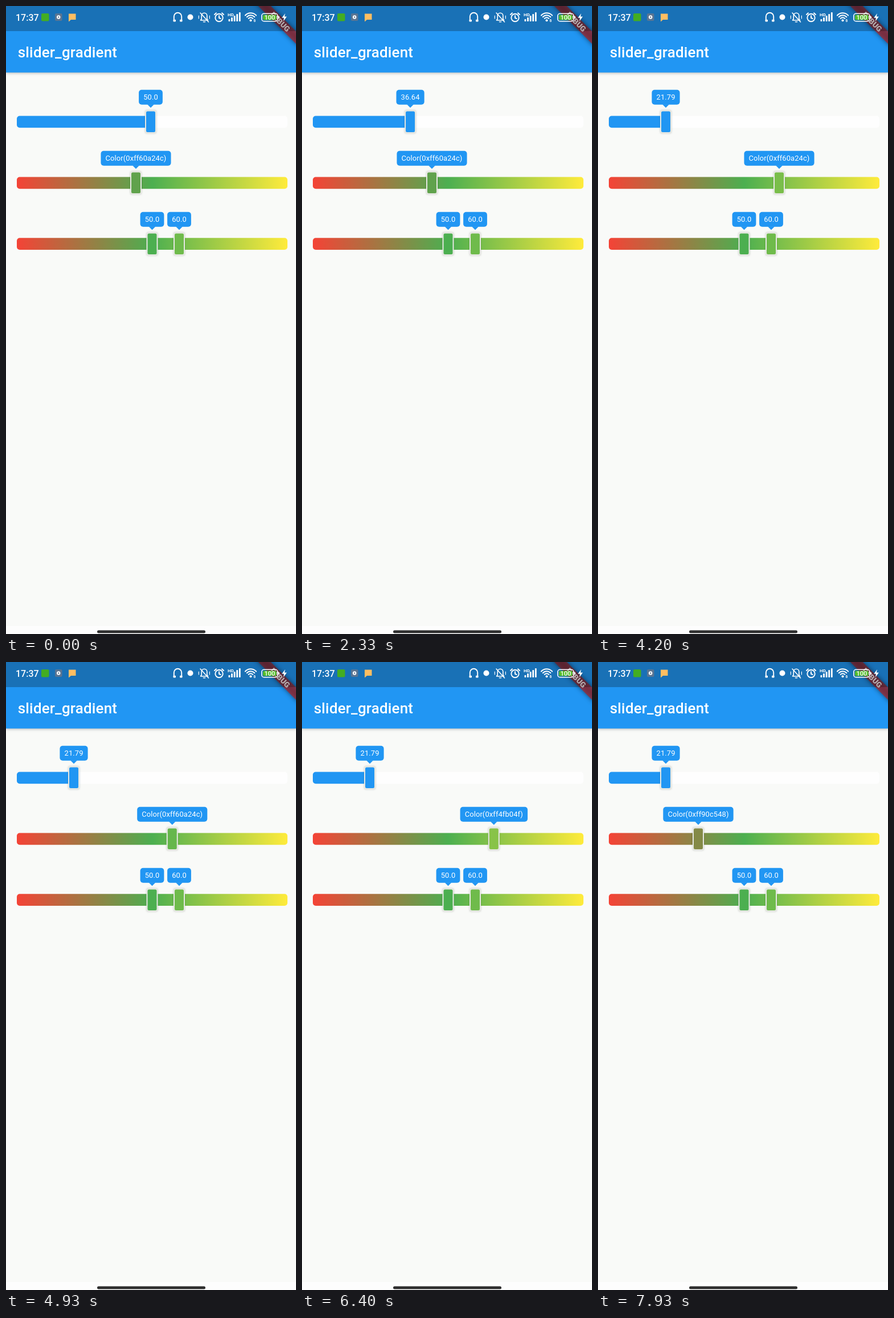
Animation, 509 px wide and 1100 px high, one loop 8 s. Source, as an HTML page with a canvas:

```html
<!DOCTYPE html>
<html lang="en">
<head>
<meta charset="utf-8">
<title>slider_gradient</title>
<style>
html, body { margin: 0; width: 100%; height: 100%; overflow: hidden; background: #f9faf8; }
canvas { display: block; width: 509px; height: 1100px; }
</style>
</head>
<body>
<canvas id="stage"></canvas>
<script>
const W = 509, H = 1100, LOOP = 8000, FPS = 15;
const BLUE = '#2196f3', FONT = 'Roboto, "Noto Sans", sans-serif';
const STOPS = [[244, 67, 54], [76, 175, 80], [255, 235, 59]];
const LEFT = 19, SPAN = 475, TRACK_H = 20.7;
const ROWS = [202.8, 309.8, 416.7];

// [step, value], at FPS steps per second
const VALUE_KEYS = [[20, 50], [35, 36.64], [45, 21.79]];
const COLOR_KEYS = [[51, .44], [63, .6295], [68, .66], [79, .509], [88, .509],
  [96, .669], [104, .69025], [110, .69025], [119, .3305], [120, .31]];
// The colour label only follows when a drag ends
const COMMITS = [[0, .44], [79, .509], [104, .69025]];

const canvas = document.getElementById('stage');
const dpr = window.devicePixelRatio || 1;
canvas.width = W * dpr;
canvas.height = H * dpr;
const ctx = canvas.getContext('2d');

// Monotone cubic through the keys, at rest on turning points
function track(keys, t) {
  const last = keys.length - 1;
  if (t <= keys[0][0]) return keys[0][1];
  if (t >= keys[last][0]) return keys[last][1];
  const slope = k => (keys[k + 1][1] - keys[k][1]) / (keys[k + 1][0] - keys[k][0]);
  const tangent = k => {
    if (k === 0 || k === last) return 0;
    const a = slope(k - 1), b = slope(k);
    return a * b <= 0 ? 0 : 2 * a * b / (a + b);
  };
  let i = 0;
  while (t > keys[i + 1][0]) i++;
  const [t0, v0] = keys[i], [t1, v1] = keys[i + 1];
  const d = t1 - t0, u = (t - t0) / d, w = 1 - u;
  return w * w * (1 + 2 * u) * v0 + u * u * (3 - 2 * u) * v1
    + d * u * w * (w * tangent(i) - u * tangent(i + 1));
}

function mix(f) {
  const i = f < .5 ? 0 : 1, u = f * 2 - i;
  return STOPS[i].map((c, k) => Math.floor(c + (STOPS[i + 1][k] - c) * u));
}
const rgb = c => `rgb(${c.join()})`;
const hex = c => 'Color(0xff' + c.map(n => n.toString(16).padStart(2, '0')).join('') + ')';

function format(v) {
  const s = String(Math.round(v * 100) / 100);
  return s.includes('.') ? s : s + '.0';
}

function box(x, y, w, h, r, fill) {
  ctx.fillStyle = fill;
  ctx.beginPath();
  ctx.roundRect(x, y, w, h, r);
  ctx.fill();
}

function shape(points, fill) {
  ctx.fillStyle = fill;
  ctx.beginPath();
  points.forEach(p => ctx.lineTo(...p));
  ctx.closePath();
  ctx.fill();
}

function line(...points) {
  ctx.beginPath();
  points.forEach(p => ctx.lineTo(...p));
  ctx.stroke();
}

function arc(x, y, r, a = 0, b = 2) {
  ctx.beginPath();
  ctx.arc(x, y, r, a * Math.PI, b * Math.PI);
  ctx.stroke();
}

function dot(x, y, r, fill) {
  ctx.fillStyle = fill;
  ctx.beginPath();
  ctx.arc(x, y, r, 0, 7);
  ctx.fill();
}

function text(s, x, y, size, weight = 400, align = 'left', spacing = 0, fill = '#fff') {
  ctx.font = `${weight} ${size}px ${FONT}`;
  ctx.letterSpacing = spacing + 'px';
  ctx.textAlign = align;
  ctx.fillStyle = fill;
  ctx.fillText(s, x, y);
}

function shadow(color, blur, y = 0) {
  ctx.shadowColor = color;
  ctx.shadowBlur = blur * dpr;
  ctx.shadowOffsetY = y * dpr;
}
const noShadow = () => shadow('transparent', 0);

function thumb(x, y, fill) {
  shadow('rgba(0,0,0,.18)', 3);
  box(x - 10, y - 20.5, 20, 41, 3.5, '#e6e8e2');
  noShadow();
  box(x - 8, y - 18.3, 16, 36.6, 2.5, fill);
}

function bubble(x, y, label) {
  ctx.font = `400 12.95px ${FONT}`;
  ctx.letterSpacing = '0.1px';
  const w = ctx.measureText(label).width + 16.2;
  box(x - w / 2, y - 56, w, 26, 5, BLUE);
  shape([[x - 6, y - 30.5], [x + 6, y - 30.5], [x, y - 24.5]], BLUE);
  text(label, x - w / 2 + 8.1, y - 38.6, 12.95, 400, 'left', .1);
}

function bar(y, w, r, fill) {
  box(LEFT, y - TRACK_H / 2, w, TRACK_H, r, fill);
}

function rainbow(y) {
  const g = ctx.createLinearGradient(LEFT, 0, LEFT + SPAN, 0);
  STOPS.forEach((c, i) => g.addColorStop(i / 2, rgb(c)));
  bar(y, SPAN, 5, g);
}

function handle(f, y, label) {
  const x = LEFT + SPAN * f;
  thumb(x, y, rgb(mix(f)));
  bubble(x, y, label);
}

function banner() {
  ctx.save();
  ctx.translate(W, 0);
  ctx.rotate(Math.PI / 4);
  ctx.filter = `blur(${4 * dpr}px)`;
  ctx.fillStyle = 'rgba(0,0,0,.5)';
  ctx.fillRect(-52, 31.3, 104, 15.6);
  ctx.filter = 'none';
  ctx.fillStyle = 'rgba(183,28,28,.63)';
  ctx.fillRect(-52, 31.3, 104, 15.6);
  text('DEBUG', 0, 43.8, 13.2, 900, 'center', 0, '#f2e9ea');
  ctx.restore();
}

function statusIcons() {
  text('17:37', 17, 26, 16, 500);
  box(62, 13, 13.5, 13.5, 2, '#43ad22');
  box(86, 13, 12.5, 13, 2, '#5a7593');
  dot(92.2, 19.5, 3.2, '#fff');
  dot(92.2, 19.5, 1.2, '#5a7593');
  shape([[110, 13.5], [122.5, 13.5], [122.5, 24], [114, 24], [110, 27.5]], '#ffbe62');

  ctx.strokeStyle = '#fff';
  ctx.lineCap = ctx.lineJoin = 'round';
  ctx.lineWidth = 1.9;
  // headphones
  ctx.beginPath();
  ctx.moveTo(294.8, 26);
  ctx.lineTo(294.8, 18.5);
  ctx.arc(301.5, 18.5, 6.7, Math.PI, 0);
  ctx.lineTo(308.2, 26);
  ctx.stroke();
  box(293.5, 23.8, 4.5, 3.8, 1, '#fff');
  box(305, 23.8, 4.5, 3.8, 1, '#fff');
  dot(323.5, 19.5, 5, '#fff');

  // muted bell
  ctx.lineWidth = 1.6;
  ctx.beginPath();
  ctx.moveTo(341.5, 25);
  ctx.lineTo(343.2, 22.5);
  ctx.lineTo(343.2, 17.5);
  ctx.arc(348, 17, 4.8, Math.PI, 0);
  ctx.lineTo(352.8, 22.5);
  ctx.lineTo(354.5, 25);
  ctx.closePath();
  ctx.stroke();
  line([346.5, 27.8], [349.5, 27.8]);
  line([341, 12], [355.5, 28]);
  ctx.lineWidth = 1.2;
  line([338.3, 17], [338.3, 22]);
  line([357.3, 17], [357.3, 22]);

  // alarm clock
  ctx.lineWidth = 1.9;
  arc(374, 20.5, 6.7);
  line([374, 17], [374, 21], [376.7, 22]);
  line([366, 15], [369, 12.3]);
  line([382, 15], [379, 12.3]);

  // signal
  text('HD', 389, 18, 8, 700);
  for (let i = 0; i < 5; i++) {
    const h = 4 + i * 3;
    box(390.5 + i * 4.6, 27 - h, 2.8, h, .8, '#fff');
  }

  // wireless fan
  ctx.lineWidth = 2;
  for (const r of [5.2, 9.2, 13.2]) arc(429.5, 25.5, r, 1.24, 1.76);
  dot(429.5, 25.3, 2, '#fff');
  text('6', 434.5, 28, 6.5, 700);

  // battery
  ctx.lineWidth = 1.6;
  ctx.beginPath();
  ctx.roundRect(448.8, 13.3, 28, 13.4, 4);
  ctx.stroke();
  box(451, 15.4, 23.6, 9.2, 2, '#55bd2c');
  box(478, 17.5, 1.6, 5, .8, '#fff');
  text('100', 462.8, 24, 11, 500, 'center');
  shape([[490, 13], [484.2, 20.8], [488, 20.8], [486.8, 27], [492.8, 18.6], [488.8, 18.6]], '#fff');
}

function draw(step) {
  ctx.setTransform(dpr, 0, 0, dpr, 0, 0);
  ctx.fillStyle = '#f9faf8';
  ctx.fillRect(0, 0, W, H);
  ctx.fillStyle = '#fdfdfd';
  ctx.fillRect(0, 1086, W, 14);
  box(160, 1093.5, 190, 5, 2.5, '#2e2e2e');

  shadow('rgba(0,0,0,.28)', 5, 1.5);
  ctx.fillStyle = BLUE;
  ctx.fillRect(0, 0, W, 116.5);
  noShadow();
  text('slider_gradient', 20.7, 90, 25.9, 500, 'left', .19);

  const value = track(VALUE_KEYS, step);
  const x = 254 + (value - 50) * 4.785;
  bar(ROWS[0], SPAN, 5, '#fefefe');
  bar(ROWS[0], x - LEFT, [5, 0, 0, 5], BLUE);
  thumb(x, ROWS[0], BLUE);
  bubble(x, ROWS[0], format(value));

  const picked = COMMITS.filter(c => c[0] <= step).pop()[1];
  rainbow(ROWS[1]);
  handle(track(COLOR_KEYS, step), ROWS[1], hex(mix(picked)));

  rainbow(ROWS[2]);
  handle(.5, ROWS[2], '50.0');
  handle(.6, ROWS[2], '60.0');

  banner();
  ctx.fillStyle = 'rgba(0,0,0,.25)';
  ctx.fillRect(0, 0, W, 44);
  statusIcons();
}

const start = performance.now();
function tick() {
  const t = (performance.now() - start) % LOOP;
  // Steps fall on whole 10 ms, so allow for the rounding
  draw(Math.floor((t + 4) * FPS / 1000) % (LOOP * FPS / 1000));
  requestAnimationFrame(tick);
}
tick();
</script>
</body>
</html>
```
